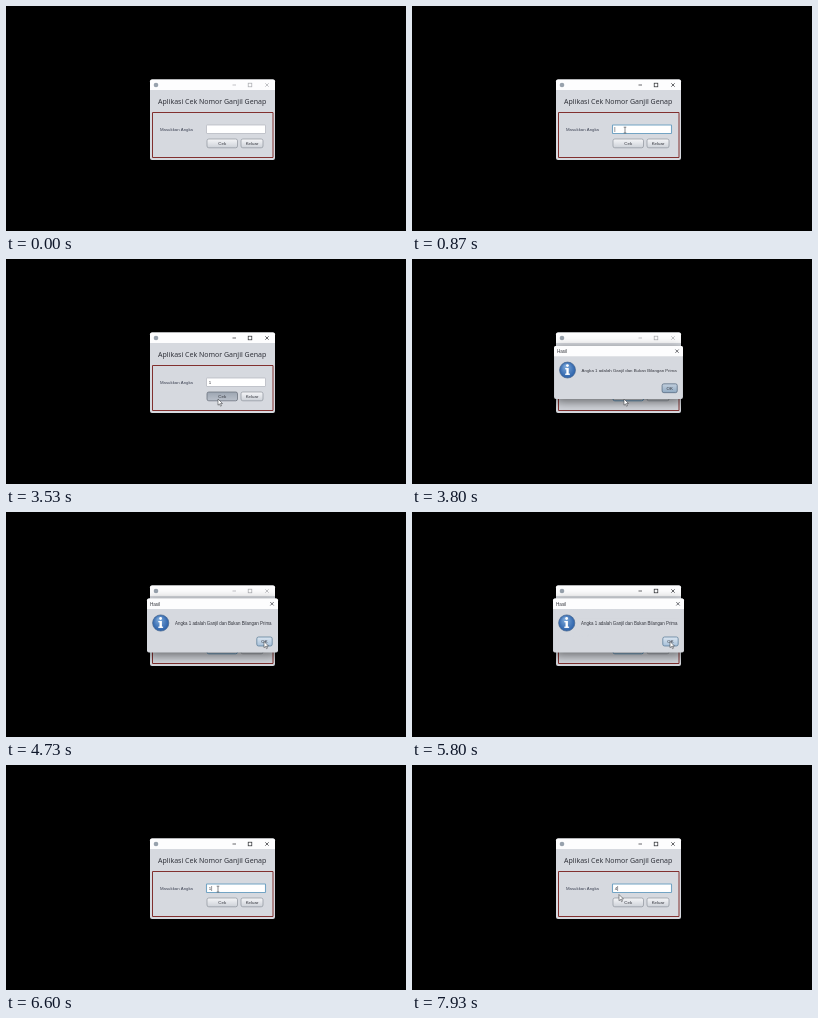
Write an HTML page with a canvas that moves like this. It is 400x225 px and loops after 8000 ms.

```html
<!DOCTYPE html>
<html lang="id">
<head>
<meta charset="utf-8">
<title>Ganjil Genap</title>
<style>
html, body { margin: 0; width: 100%; height: 100%; overflow: hidden; background: #000; }
canvas { display: block; width: 100vw; height: 100vh; }
</style>
</head>
<body>
<canvas id="stage"></canvas>
<script>
const W = 400, H = 225, LOOP = 8000;
const canvas = document.getElementById('stage');
const ctx = canvas.getContext('2d');
const UI = '"Liberation Sans", Arial, sans-serif';
const HEAD = '"Noto Sans", sans-serif';

const ACTIVATE = 800, OPEN = 3670, CLOSE = 5800;
const FIELD = { x: 200.5, y: 119, w: 59, h: 8.5 };
const BODY = '#d6d9df', BAR = '#fdfdfe', INK = '#30323a';

// time, x, y of the pointer tip
const path = [
  [130, 44, 222], [800, 213, 124],
  [2800, 213, 124], [3400, 212, 140],
  [3930, 212, 140], [4400, 237, 135], [4470, 237, 135], [4730, 258, 129.5],
  [5950, 258, 129.5], [6400, 241, 131], [6470, 241, 131], [6600, 212, 124],
  [7540, 212, 124], [7870, 207, 129.5], [LOOP, 207, 129.5]
];

const clamp = v => Math.max(0, Math.min(1, v));
const within = (t, a, b) => t >= a && t < b;

function pointerAt(t) {
  if (t < path[0][0]) return null;
  const i = path.findIndex(p => p[0] > t);
  const [t0, x0, y0] = path[i - 1], [t1, x1, y1] = path[i];
  const p = (t - t0) / (t1 - t0), e = p * p * (3 - 2 * p);
  return { x: x0 + (x1 - x0) * e, y: y0 + (y1 - y0) * e };
}

function box(x, y, w, h, r, fill, stroke, line = 0.7) {
  ctx.beginPath();
  ctx.roundRect(x, y, w, h, r);
  if (fill) { ctx.fillStyle = fill; ctx.fill(); }
  if (stroke) { ctx.strokeStyle = stroke; ctx.lineWidth = line; ctx.stroke(); }
}

function disc(x, y, r, fill, stroke) {
  box(x - r, y - r, r * 2, r * 2, r, fill, stroke);
}

function text(s, x, y, size, color, align = 'left', family = UI) {
  ctx.font = size + 'px ' + family;
  ctx.textAlign = align;
  ctx.fillStyle = color;
  ctx.fillText(s, x, y);
}

function lines(color, width, ...segs) {
  ctx.strokeStyle = color;
  ctx.lineWidth = width;
  ctx.beginPath();
  for (const [a, b, c, d] of segs) { ctx.moveTo(a, b); ctx.lineTo(c, d); }
  ctx.stroke();
}

function cross(x, y, color) {
  const r = 1.7;
  lines(color, 0.7, [x - r, y - r, x + r, y + r], [x - r, y + r, x + r, y - r]);
}

function button(label, x, y, w, h, look) {
  const [top, bottom, edge] = {
    plain: ['#f5f6f8', '#cdd1d8', '#8f949d'],
    focus: ['#f5f6f8', '#cdd1d8', '#6698bd'],
    down: ['#9da6b2', '#b9c0ca', '#606873'],
    main: ['#c3d0de', '#8fa9c2', '#4c6078'],
    hover: ['#dbe6f1', '#a6bfd8', '#4f7390']
  }[look];
  const fill = ctx.createLinearGradient(0, y, 0, y + h);
  fill.addColorStop(0, top);
  fill.addColorStop(1, bottom);
  box(x, y, w, h, 1.8, fill, edge, look === 'focus' ? 1 : 0.7);
  text(label, x + w / 2, y + h / 2 + 1.6, 4.4, INK, 'center');
}

function frame(x, y, w, h, shadow = 0) {
  const unit = canvas.width / W;
  ctx.save();
  ctx.shadowColor = `rgba(0, 0, 0, ${shadow})`;
  ctx.shadowBlur = 12 * unit;
  ctx.shadowOffsetY = 3 * unit;
  box(x, y, w, h, 2, BODY);
  ctx.restore();
  box(x, y, w, 10.5, [2, 2, 0, 0], BAR);
}

function typedAt(t) {
  if (t < 1930 || within(t, 6800, 7870)) return '';
  return t < 6800 ? '1' : '4';
}

function caretOn(t) {
  const spans = [[ACTIVATE, 1370], [1930, 2430], [6600, 7400], [7870, LOOP]];
  return spans.some(([a, b]) => within(t, a, b));
}

function drawMain(t) {
  const active = within(t, ACTIVATE, OPEN) || t >= CLOSE;
  const ink = active ? '#26272b' : '#a6a8ac';
  frame(144, 73.5, 125, 80.5);

  disc(150, 79, 2.3, '#98a2ad');
  lines(ink, 0.7, [226.5, 79, 230, 79]);
  ctx.strokeRect(242.2, 77.2, 3.6, 3.6);
  cross(261, 79, ink);

  text('Aplikasi Cek Nomor Ganjil Genap', 152, 98, 7, INK, 'left', HEAD);
  box(146.5, 106.5, 120.5, 45, 0, null, '#82302f', 1);
  text('Masukkan Angka', 154, 125, 4.3, '#3b4052');

  const focused = within(t, ACTIVATE, 3400) || t >= 6600;
  const { x, y, w, h } = FIELD;
  box(x, y, w, h, 0.5, '#fff', focused ? '#73a4c4' : '#b0b4bc', focused ? 1.1 : 0.7);
  const typed = typedAt(t);
  text(typed, 202.8, 125.1, 4.4, INK);
  if (caretOn(t)) {
    const cx = typed ? 205.6 : 202.8;
    lines('#55575e', 0.6, [cx, 121, cx, 126]);
  }

  const look = within(t, 3470, 3600) ? 'down' : within(t, 3600, 6600) ? 'focus' : 'plain';
  button('Cek', 201, 133, 30.5, 8.8, look);
  button('Keluar', 235, 133, 22, 8.8, 'plain');
}

function drawDialog(t) {
  if (!within(t, OPEN, CLOSE + 200)) return;
  const p = clamp((t - OPEN) / 230), q = clamp((t - CLOSE) / 200);
  const scale = 0.8 + 0.2 * (1 - (1 - p) ** 3) - 0.06 * q;
  ctx.save();
  ctx.globalAlpha = Math.min(1, p * 1.8) * (1 - q) ** 1.5;
  ctx.translate(206.5, 113.5);
  ctx.scale(scale, scale);
  ctx.translate(-206.5, -113.5);

  frame(141, 86.5, 131, 54, 0.55);
  text('Hasil', 144, 93.8, 4.6, INK);
  cross(266, 91.8, INK);

  const blue = ctx.createRadialGradient(153, 107, 1, 154.7, 111, 8.5);
  blue.addColorStop(0, '#79a6d8');
  blue.addColorStop(1, '#285ea8');
  disc(154.7, 111, 8.1, blue, '#48688f');
  disc(154.6, 106.5, 1.4, '#fff');
  ctx.fillRect(153.5, 109, 2.4, 6.5);
  ctx.fillRect(152.3, 109, 2, 1.3);
  ctx.fillRect(152.3, 114.6, 4.8, 1.3);

  text('Angka 1 adalah Ganjil dan Bukan Bilangan Prima', 169, 112.6, 4.42, INK);
  const look = within(t, 5600, 5730) ? 'down' : t >= 4600 ? 'hover' : 'main';
  button('OK', 250.8, 125, 15.4, 9, look);
  ctx.restore();
}

function drawPointer(t) {
  const c = pointerAt(t);
  if (!c) return;
  const { x, y, w, h } = FIELD;
  const inField = c.x > x && c.x < x + w && c.y > y && c.y < y + h;
  if (inField && !within(t, OPEN, CLOSE)) {
    lines('#55575e', 0.7,
      [c.x, c.y - 2.8, c.x, c.y + 3],
      [c.x - 1.3, c.y - 2.8, c.x + 1.3, c.y - 2.8],
      [c.x - 1.3, c.y + 3, c.x + 1.3, c.y + 3]);
    return;
  }
  const tip = new Path2D('M0 0V6.2L1.5 4.9L2.5 7.2L3.5 6.7L2.5 4.5H4.5Z');
  ctx.save();
  ctx.translate(c.x, c.y);
  ctx.fillStyle = '#fff';
  ctx.strokeStyle = '#46474c';
  ctx.lineWidth = 0.6;
  ctx.fill(tip);
  ctx.stroke(tip);
  ctx.restore();
}

function resize() {
  const d = window.devicePixelRatio || 1;
  canvas.width = Math.round(innerWidth * d);
  canvas.height = Math.round(innerHeight * d);
}

function draw(now) {
  const t = now % LOOP;
  ctx.setTransform(canvas.width / W, 0, 0, canvas.height / H, 0, 0);
  ctx.fillStyle = '#000';
  ctx.fillRect(0, 0, W, H);
  drawMain(t);
  drawDialog(t);
  drawPointer(t);
}

addEventListener('resize', resize);
resize();
const start = performance.now();
function tick() {
  draw(performance.now() - start);
  requestAnimationFrame(tick);
}
tick();
</script>
</body>
</html>
```
